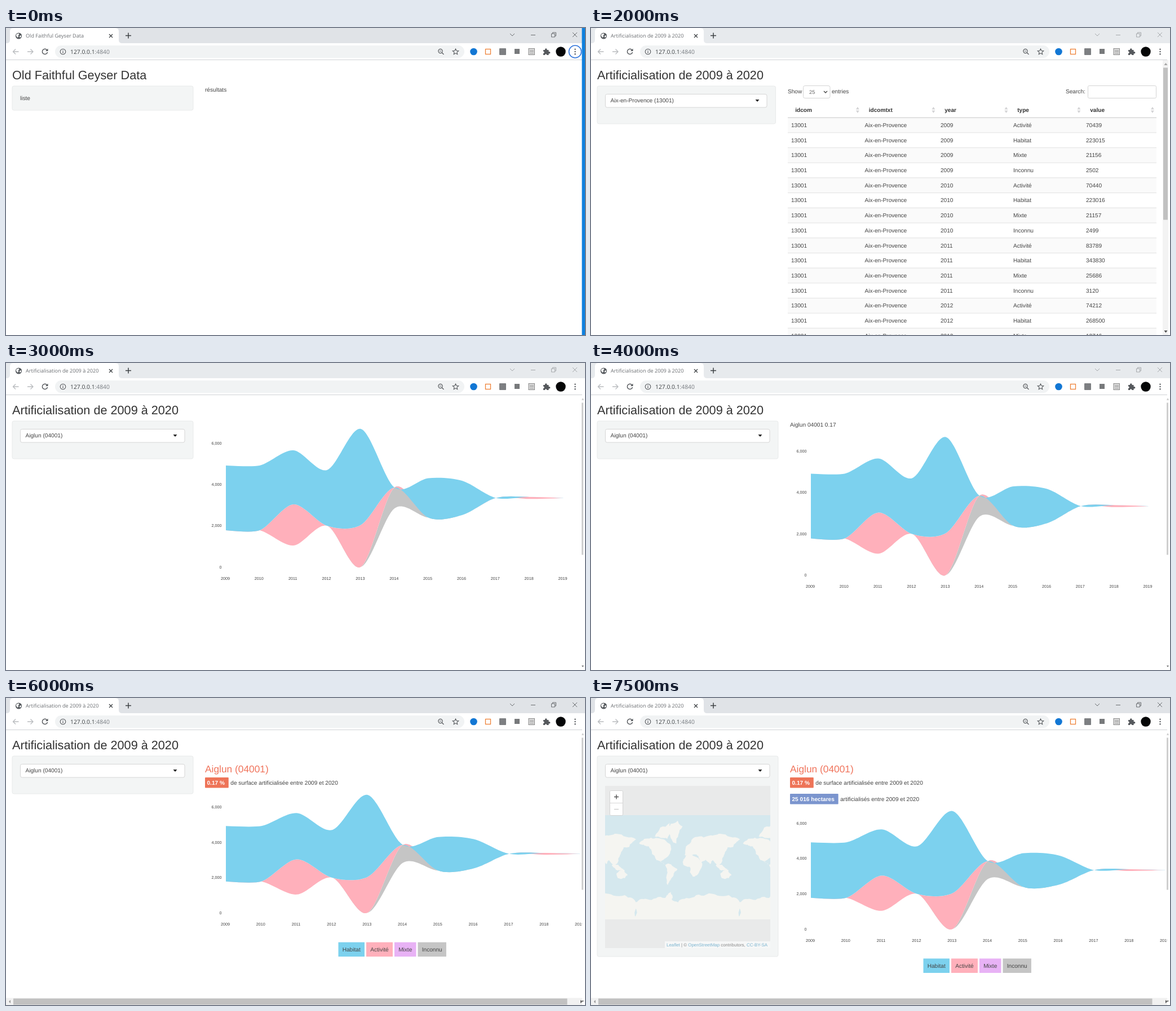
These frames come from a looping animation (1027 by 545 pixels, 8 s). An HTML page:

```html
<!DOCTYPE html>
<html lang="fr">
<head>
<meta charset="utf-8">
<title>Artificialisation</title>
<style>
html, body { margin: 0; width: 100%; height: 100%; overflow: hidden; background: #fff; }
svg { display: block; font-family: "Liberation Sans", Arial, sans-serif; text-rendering: geometricPrecision; }
text { white-space: pre; }
.ui { font-family: "Open Sans", "Noto Sans", sans-serif; }
</style>
</head>
<body>
<svg id="stage" width="1027" height="545" viewBox="0 0 1027 545"></svg>
<script>
const LOOP = 8000, STEP = 500;
// When each part of the app shows up, in ms
const AT = { picker: 500, maximised: 1000, table: 1500, chart: 2500, summary: 3500,
  legend: 4500, heading: 5500, hectares: 6500, map: 7000 };

const ZOOM = .7225, BODY = 14 * ZOOM, TITLE = 30 * ZOOM, HEADING = 24 * ZOOM, TICK = 10 * ZOOM;
const COLORS = { Habitat: '#7cd1ee', Activité: '#ffb0bb', Mixte: '#e8b2f5', Inconnu: '#c5c5c5' };
const BOLD = 'font-weight="bold"';

const rect = (x, y, w, h, fill, more = '') =>
  `<rect x="${x}" y="${y}" width="${w}" height="${h}" fill="${fill}" ${more}/>`;
const circle = (x, y, r, fill, more = '') => `<circle cx="${x}" cy="${y}" r="${r}" fill="${fill}" ${more}/>`;
const shape = (d, fill) => `<path d="${d}" fill="${fill}"/>`;
const line = (d, stroke, width = 1) => `<path d="${d}" fill="none" stroke="${stroke}" stroke-width="${width}"/>`;
const text = (x, y, s, size = BODY, fill = '#444', more = '') =>
  `<text x="${x}" y="${y}" font-size="${size}" fill="${fill}" ${more}>${s}</text>`;

const pen = document.createElement('canvas').getContext('2d');
function textWidth(s, weight = 'normal') {
  pen.font = `${weight} 100px "Liberation Sans", Arial, sans-serif`;
  return pen.measureText(s).width * BODY / 100;
}

// Browser window
function browser(title, active, ring) {
  const dark = '#55585c', pale = '#b9bcbf', win = active ? '#6a6d70' : '#a6a9ac';
  return rect(0, 0, 1027, 27, active ? '#e0e3e7' : '#e7eaed') +
    shape('M1 27Q7 27 7 21V6Q7 0 13 0H194Q200 0 200 6V21Q200 27 206 27Z', '#fff') +
    circle(22.5, 14, 5.6, '#55595d') +
    shape('M18.5 11l4-1.5 1 2-2 1.5 1 2-2 2-2.5-3zM24 14l3-1-.5 3-2 1z', '#fff') +
    text(35, 17.3, title, 9.1, '#6b6e72', 'class="ui"') +
    line('M183 11l6 6m0-6l-6 6', '#3c4043', 1.3) +
    line('M212 13.5h10m-5-5v10', '#3c4043', 1.5) +
    line('M894 10l4 4 4-4M931 12.5h8M1005 8l8 8m0-8l-8 8', win) +
    line('M967.5 10h6v6h-6zM969.5 10v-2h6v6h-2', win) +
    rect(0, 27, 1027, 30, '#fff') + rect(0, 56, 1022, 1, '#d0d2d5') +
    rect(87, 31, 726, 22, '#f1f3f4', 'rx="11"') +
    line('M22.5 42h-10m4.5-4.5l-4.5 4.5 4.5 4.5M38 42h10m-4.5-4.5l4.5 4.5-4.5 4.5', pale, 1.3) +
    line('M73 39.3a4.7 4.7 0 1 0 .6 3.7', dark, 1.5) + shape('M74.5 36.5v4.5h-4.5z', dark) +
    circle(101, 42, 4.8, 'none', `stroke="${dark}" stroke-width="1.1"`) +
    line('M101 39v1.3M101 41.3v3.5', dark, 1.2) +
    text(114, 45.6, '127.0.0.1<tspan fill="#777b80">:4840</tspan>', 10.3, '#3c4043', 'class="ui"') +
    circle(770.5, 41, 3.6, 'none', `stroke="${dark}" stroke-width="1.2"`) +
    line('M773 43.5l3.5 3.5M768.8 41h3.4', dark, 1.2) +
    line('M797.5 37l1.5 3.3 3.7.4-2.8 2.4.8 3.6-3.2-1.9-3.2 1.9.8-3.6-2.8-2.4 3.7-.4z', dark, 1.1) +
    circle(829.5, 42, 6.3, '#1277d4') +
    rect(850.5, 37.5, 9, 9, 'none', 'stroke="#ee8136" stroke-width="1.3"') +
    rect(875, 36, 12, 12, '#7d7f82', 'rx="1"') +
    rect(902, 37, 9, 9, '#77797b') +
    rect(927, 36.5, 10.5, 11, '#dcdcdc', 'stroke="#888"') + line('M929 40h7m-7 2h7m-7 3h7', '#999') +
    shape('M953 39h3v-1a1.8 1.8 0 0 1 3.6 0v1h3v3h1a1.8 1.8 0 0 1 0 3.6h-1V48h-3.2a1.8 1.8 0 0 0-3.6 0H953v-3a1.8 1.8 0 0 0 0-3.6z', dark) +
    circle(984, 42, 8.7, '#050607') +
    [-1, 0, 1].map(i => circle(1009.5, 42 + i * 4.2, 1.2, dark)).join('') +
    (ring ? circle(1009.5, 42, 11, 'none', 'stroke="#2f74dc" stroke-width="1.6"') : '');
}

// Sidebar
const panel = (right, bottom) =>
  rect(11, 103, right - 11, bottom - 103, '#f3f5f5', 'rx="3" stroke="#e8eaea"');

const picker = (label, right) =>
  rect(25.5, 117.5, right - 25.5, 23.5, '#fff', 'rx="3" stroke="#d6d6d6"') +
  text(34.5, 132, label) + shape(`M${right - 20.5} 127h7l-3.5 4z`, '#222');

// World map: a few key points per landmass, the coast is roughened by midpoint displacement
const WORLD = 256 * .72;
const LAND = [
  '6,50 27,40 50,43 63,60 52,77 43,82 51,88 37,80 29,69 22,55',
  '34,38 60,14 56,42',
  '55,26 74,10 83,20 72,50 65,46',
  '52,88 62,87 74,96 67,107 57,124 55,106',
  '89,72 109,75 118,86 108,107 101,109 96,92 84,87',
  '87,71 99,44 128,37 150,33 185,43 172,57 163,57 156,73 145,90 137,80 132,87 124,79 114,85 108,70',
  '150,104 164,97 170,106 165,112 152,111',
  '142,89 153,88 163,96 149,97',
  '-3,157 20,149 52,147 62,136 64,150 75,155 90,147 125,141 165,142 187,157 187,200 -3,200'
];

function coastline(points, seed) {
  const random = () => (seed = seed * 16807 % 2147483647) / 2147483647;
  let p = points.split(' ').map(s => s.split(',').map(Number));
  for (let pass = 0; pass < 3; pass++) {
    p = p.flatMap(([x, y], i) => {
      const [nx, ny] = p[(i + 1) % p.length], k = (random() - .5) * .3;
      return [[x, y], [(x + nx) / 2 - (ny - y) * k, (y + ny) / 2 + (nx - x) * k]];
    });
  }
  return 'M' + p.map(q => q.map(v => v.toFixed(1)).join(' ')).join('L') + 'Z';
}
const COAST = LAND.map((points, i) => coastline(points, 421 + i * 97)).join('');

function map() {
  const left = 171.5 - WORLD / 2;
  const worlds = [-1, 0, 1].map(i =>
    `<g transform="translate(${left + i * WORLD} 208)">${shape(COAST, '#f5f5f1')}</g>`).join('');
  const link = s => `<tspan fill="#79b3cf">${s}</tspan>`;
  return rect(25, 156, 293, 288, '#e9eaea') +
    `<svg x="25" y="208" width="293" height="185" viewBox="25 208 293 185">
      ${rect(25, 208, 293, 185, '#d5e8ee')}${worlds}</svg>` +
    rect(33.5, 164.5, 23, 44, '#fff', 'rx="2" stroke="#d4d4d4"') + rect(34, 186, 22, 1, '#d8d8d8') +
    line('M41 175.5h8m-4-4v8', '#555', 1.4) + line('M41 197.5h8', '#c6c6c6', 1.2) +
    rect(131, 432, 187, 12, '#f6f7f7') +
    text(134, 441, `${link('Leaflet')} | © ${link('OpenStreetMap')} contributors, ${link('CC-BY-SA')}`, 11 * .72, '#888');
}

// Data table
const COLUMNS = { idcom: 355, idcomtxt: 485.5, year: 620, type: 749, value: 878 };
const RECORDS = {
  Activité: [70439, 70440, 83789, 74212],
  Habitat: [223015, 223016, 343830, 268500],
  Mixte: [21156, 21157, 25686, 12746],
  Inconnu: [2502, 2499, 3120]
};

function table() {
  const xs = Object.values(COLUMNS), types = Object.keys(RECORDS), rowHeight = 26.7;
  let out = text(349, 116, 'Show') + rect(376.5, 102.5, 47.5, 22, '#fff', 'rx="3" stroke="#d4d4d4"') +
    text(387, 117, '25', 9.4, '#666') + line('M413 112l3 3 3-3', '#444', 1.3) + text(427, 116, 'entries') +
    text(842, 116, 'Search:') + rect(881.5, 102.5, 121, 22, '#fff', 'rx="2" stroke="#d4d4d4"');
  Object.keys(COLUMNS).forEach((name, i) => {
    const sort = (xs[i + 1] || 1008.5) - 15.6;
    out += text(xs[i] + 7.2, 148.7, name, BODY, '#333', BOLD) +
      shape(`M${sort} 144.5h6l-3-4.5zM${sort} 146.5h6l-3 4.5z`, '#d3d3d5');
  });
  for (let i = 0; i < 15; i++) {
    const y = 158.6 + i * rowHeight, type = types[i % 4], n = Math.floor(i / 4);
    if (i % 2 === 0) out += rect(349, y, 654, rowHeight, '#fafafa');
    out += rect(349, y, 654, 1, i ? '#e2e2e2' : '#c8c8c8');
    ['13001', 'Aix-en-Provence', 2009 + n, type, RECORDS[type][n]]
      .forEach((cell, c) => out += text(xs[c], y + 17.3, cell));
  }
  return out;
}

// Stream chart: half of each yearly total lies on either side of the middle
const MIDDLE = 3340;
const HALF = [1570, 1570, 2305, 1350, MIDDLE, 505, 955, 830, 0, 50, 4];
const PINK = { 2011: 1990, 2013: 2030, 2018: 100 }, GREY = { 2014: 1010 };
const addYears = (low, layer) => low.map((v, i) => v + (layer[2009 + i] || 0));
const bottom = HALF.map(h => MIDDLE - h), upper = HALF.map(h => MIDDLE + h);
const greyTop = addYears(bottom, GREY), pinkTop = addYears(greyTop, PINK);

// Cardinal spline with quadratic end segments
function spline(p) {
  const last = p.length - 1, pt = i => p[i].map(v => v.toFixed(2)).join(' ');
  const handle = (i, k) =>
    p[i].map((v, c) => (v + k * .15 * (p[i + 1][c] - p[i - 1][c])).toFixed(2)).join(' ') + ' ';
  let d = `${pt(0)}Q${handle(1, -2 / 3)}${pt(1)}`;
  for (let i = 2; i < last; i++) d += `C${handle(i - 1, 1)}${handle(i, -1)}${pt(i)}`;
  return d + `Q${handle(last - 1, 2 / 3)}${pt(last)}`;
}

function chart(y0, wide) {
  const dx = wide ? 62.8 : 59.85, dy = (wide ? 31.35 : 36.67) / 1000;
  const points = v => v.map((n, i) => [390 + i * dx, y0 - n * dy]);
  const area = (low, high, fill) =>
    shape('M' + spline(points(high)) + 'L' + spline(points(low).reverse()) + 'Z', fill);
  let out = area(bottom, greyTop, COLORS.Inconnu) + area(greyTop, pinkTop, COLORS.Activité) +
    area(pinkTop, upper, COLORS.Habitat);
  for (let v = 0; v <= 6000; v += 2000)
    out += text(382.5, y0 + 2.6 - v * dy, v.toLocaleString('en-US'), TICK, '#444', 'text-anchor="end"');
  HALF.forEach((_, i) =>
    out += text(389 + i * dx, y0 + 22.6, 2009 + i, TICK, '#444', 'text-anchor="middle"'));
  return out + rect(1021.5, 57, 6, 488, '#fff');
}

function legend(y) {
  let x = 589.5;
  return Object.entries(COLORS).map(([name, fill]) => {
    const w = textWidth(name) + 14.4, item = rect(x, y, w, 25.5, fill) + text(x + 7.2, y + 16, name);
    x += w + 3;
    return item;
  }).join('');
}

function badge(y, fill, label, note) {
  const w = textWidth(label, 'bold') + 10.3;
  return rect(353, y, w, 18.5, fill, 'rx="1"') + text(356.5, y + 13, label, BODY, '#fff', BOLD) +
    text(356.5 + w, y + 13, note);
}

// Scrollbars
const wideBar = () => rect(1014, 57, 10, 488, '#f3f3f3') + rect(1015, 70.5, 8, 270, '#c1c1c1') +
  shape('M1016.5 66h6l-3-4z', '#a5a5a5') + shape('M1016.5 537h6l-3 4z', '#505050');
const thinBar = () => rect(1021, 70.5, 3, 270, '#cfcfcf') +
  shape('M1021 66h4l-2-4z', '#ccc') + shape('M1021 537h4l-2 3z', '#777');
const bottomBar = () => rect(0, 532.5, 1022, 12.5, '#f1f1f1') + rect(13, 533.5, 982.5, 11, '#c1c1c1') +
  shape('M8 536v6l-3-3z', '#999') + shape('M1019 536v6l3-3z', '#505050');

function page(time) {
  const on = {};
  for (const part in AT) on[part] = time >= AT[part];
  const tabled = on.table && !on.chart;
  const title = on.picker ? 'Artificialisation de 2009 à 2020' : 'Old Faithful Geyser Data';
  let out = rect(0, 0, 1027, 545, '#fff');

  if (on.chart) {
    const y0 = (on.legend ? 326 : 362) + on.summary * 14.5 + on.heading * 40.8 + on.hectares * 28.9;
    out += chart(y0, on.legend);
    if (on.legend) out += legend(y0 + 52.3) + bottomBar();
  }
  out += browser(title, !on.picker || on.legend, !on.picker) + text(11, 91, title, TITLE, '#333');

  out += panel(tabled ? 327.5 : 332, on.map ? 459 : on.picker ? 170 : 146);
  out += on.picker
    ? picker(on.chart ? 'Aiglun (04001)' : 'Aix-en-Provence (13001)', tabled ? 312 : 317)
    : text(25, 128, 'liste');
  if (on.map) out += map();

  if (tabled) out += table() + wideBar();
  if (!on.table) out += text(353, 113.3, 'résultats');
  if (on.summary && !on.heading) out += text(353, 113.3, 'Aiglun 04001 0.17');
  if (on.heading) out += text(353, 132.2, 'Aiglun (04001)', HEADING, '#f0745c') +
    badge(141, '#ee7458', '0.17 %', 'de surface artificialisée entre 2009 et 2020');
  if (on.hectares) out += badge(170, '#7b95ce', '25 016 hectares', 'artificialisés entre 2009 et 2020');
  if (on.chart) out += thinBar();
  if (!on.maximised) out += rect(1021.5, 0, 5.5, 545, '#0f80de');
  return out;
}

const stage = document.getElementById('stage');
const start = performance.now();
let shown = -1;
function draw(now) {
  const time = Math.max(0, now - start) % LOOP, step = Math.floor(time / STEP);
  if (step !== shown) {
    shown = step;
    stage.innerHTML = page(time);
  }
  requestAnimationFrame(draw);
}
draw(start);
</script>
</body>
</html>
```
